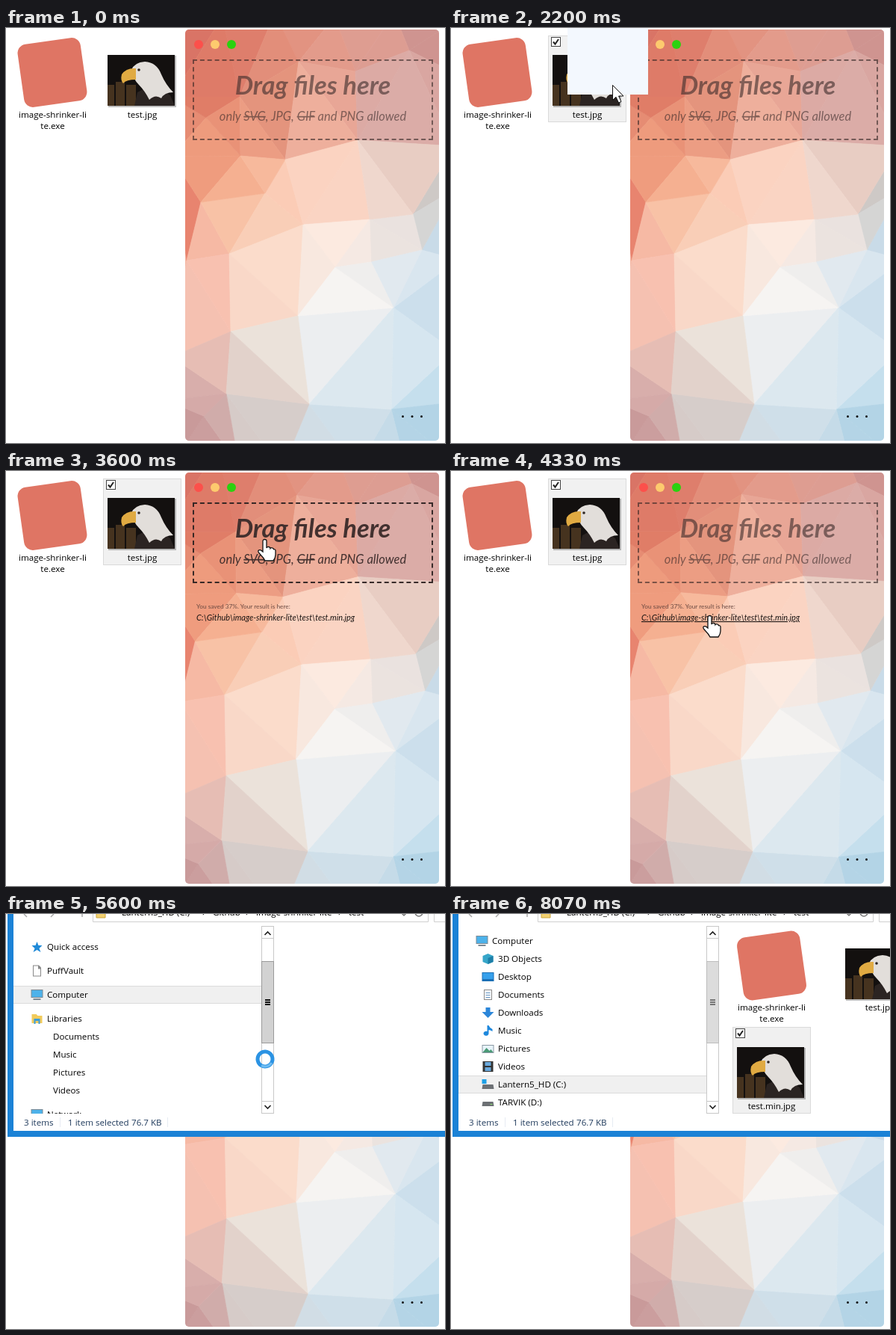
These frames come from a looping animation (588 px wide and 555 px high, 8.19 s). An HTML page:

```html
<!DOCTYPE html>
<html lang="en">
<head>
<meta charset="utf-8">
<title>Shrinking an image by drag and drop</title>
<style>
  html, body { margin: 0; width: 588px; height: 555px; overflow: hidden; background: #fff; }
  svg { display: block; }
  text { font: 11.6px "Open Sans", "Noto Sans", sans-serif; white-space: pre; }
  .mid { text-anchor: middle; }
  .lato, .lato text { font-family: Lato, "Open Sans", sans-serif; }
  #zone { fill: #3b2b2a; }
  #zone div { box-sizing: border-box; height: 108px; border: 2px dashed #2f2322; }
  #zone .title { font-size: 34.5px; font-weight: 700; font-style: italic; }
  #zone .hint { font-size: 16.5px; font-style: italic; }
  .hint .no { text-decoration: line-through; }
  #result .note { font-size: 8.3px; fill: #6b4a42; }
  #link { font-size: 10.95px; font-style: italic; fill: #1c1513; }
  .status { fill: #1e395b; }
</style>
</head>
<body>
<svg id="stage" width="588" height="555" viewBox="0 0 588 555">
  <defs>
    <clipPath id="appClip"><rect x="240" y="2" width="340" height="550" rx="5"/></clipPath>
    <clipPath id="navClip"><rect x="10" y="14" width="332" height="253"/></clipPath>
    <g id="logo"><rect x="-42.5" y="-42.5" width="85" height="85" rx="12" transform="rotate(-8)" fill="#df7564"/></g>
    <g id="photo">
      <rect x="1" y="1" width="91" height="69" fill="#000" opacity=".25"/>
      <path d="M0 0h90v68H0z" fill="#13100f"/>
      <path d="M0 40h9v28H0zM11 36h12v32H11zM25 40h13v28H25z" fill="#46331f"/>
      <path d="M40 50Q62 36 84 54L90 68H36z" fill="#2b2422"/>
      <path d="M32 20Q36 10 50 9Q66 10 72 26Q78 40 88 50Q76 50 72 58Q64 52 56 60Q50 48 42 40Q34 32 32 20Z" fill="#e2deda"/>
      <path d="M38 18Q25 17 19 26Q17 34 21 38Q25 33 38 33Z" fill="#e0aa42"/>
      <circle cx="42" cy="20" r="1.8" fill="#2b2422"/>
    </g>
    <g id="doc">
      <path d="M.5.5H45L63.5 19V83.5H.5z" fill="#f2f2f2" stroke="#d4d4d4"/>
      <path d="M45 .5V19H63.5z" fill="#fbfbfb" stroke="#d4d4d4"/>
    </g>
    <g id="box"><rect x=".5" y=".5" width="12" height="12" fill="#fff" stroke="#444"/></g>
    <path id="tick" d="M3 6.5L5.5 9.5L10 3" fill="none" stroke="#222" stroke-width="2"/>
  </defs>

  <g id="desktop">
    <use href="#logo" x="62" y="59.5"/>
    <text class="mid" x="62.5" y="120">image-shrinker-li</text>
    <text class="mid" x="62.5" y="135">te.exe</text>
    <rect id="tile" x="130.5" y="10.5" width="104" height="115"/>
    <use href="#photo" x="136" y="36"/>
    <g id="check" transform="translate(134 12)"><use href="#box"/><use id="checkMark" href="#tick"/></g>
    <text class="mid" x="182.5" y="120">test.jpg</text>
  </g>

  <g id="app" class="lato">
    <g clip-path="url(#appClip)"><g id="facets" stroke-width=".7" stroke-linejoin="round"></g></g>
    <circle cx="258" cy="22" r="6" fill="#fc504b"/>
    <circle cx="280" cy="22" r="6" fill="#fdca6e"/>
    <circle cx="302" cy="22" r="6" fill="#2bd10f"/>
    <g id="zone">
      <foreignObject x="250" y="42" width="322" height="108"><div></div></foreignObject>
      <text class="title mid" x="411" y="89">Drag files here</text>
      <text class="hint mid" x="411" y="124">only <tspan class="no">SVG</tspan>, JPG, <tspan class="no">GIF</tspan> and PNG allowed</text>
    </g>
    <g id="result">
      <text class="note" x="255" y="184">You saved 37%. Your result is here:</text>
      <text id="link" x="255" y="200">C:\Github\image-shrinker-lite\test\test.min.jpg</text>
    </g>
    <g fill="#111"><circle cx="531.5" cy="519.5" r="1.5"/><circle cx="544" cy="519.5" r="1.5"/><circle cx="556.5" cy="519.5" r="1.5"/></g>
  </g>

  <g id="explorer">
    <rect id="frame" x="2" y="-202" width="700" height="500"/>
    <rect x="10" y="-194" width="684" height="484" fill="#fff"/>
    <path d="M116.5-20V10.5H565.5V-20M573.5-20V10.5H640" fill="none" stroke="#d0d0d0"/>
    <g id="content">
      <path d="M121-8h12V5H121z" fill="#f3d06f" stroke="#c9a53c"/>
      <path d="M24 0l4 4M60 4l4-4M102-6V4" fill="none" stroke="#aaa" stroke-width="1.5"/>
      <path d="M530-1l3 3 3-3M548-2a5 5 0 0 0 10 0" fill="none" stroke="#777" stroke-width="1.5"/>
      <g><text x="155" y="2">Lantern5_HD (C:)</text><text x="263" y="2">›</text><text x="277" y="2">Github</text>
        <text x="321" y="2">›</text><text x="335" y="2">image-shrinker-lite</text><text x="445" y="2">›</text><text x="459" y="2">test</text></g>
      <g clip-path="url(#navClip)"><g id="nav1"></g><g id="nav2"></g></g>
      <g fill="#fff" stroke="#c8c8c8">
        <rect x="342.5" y="16.5" width="16" height="250"/><path d="M342.5 32.5h16M342.5 250.5h16"/>
        <rect id="thumb" x="342.5" y="63.5" width="16" height="109"/>
      </g>
      <path d="M346.5 28l4-4 4 4M346.5 256l4 4 4-4" fill="none" stroke="#222" stroke-width="1.7"/>
      <path id="grip" d="M347 115h7M347 118h7M347 121h7" stroke-width="2"/>
      <g id="files">
        <rect id="pick" x="377.5" y="151.5" width="104" height="115"/>
        <g id="docs"><use href="#doc" x="397" y="27"/><use href="#doc" x="543" y="27"/><use href="#doc" x="397" y="159"/></g>
        <g id="thumbs"><use href="#logo" x="429.5" y="69"/><use href="#photo" x="528" y="46"/><use href="#photo" x="383" y="178"/></g>
        <g transform="translate(381 153)"><use href="#box"/><use href="#tick"/></g>
        <text class="mid" x="429.5" y="129">image-shrinker-li</text>
        <text class="mid" x="429.5" y="144">te.exe</text>
        <text class="mid" x="574.5" y="129">test.jpg</text>
        <text class="mid" x="429.5" y="261">test.min.jpg</text>
      </g>
      <text class="status" x="24" y="283">3 items</text>
      <text class="status" x="83" y="283">1 item selected</text>
      <text class="status" x="168" y="283">76.7 KB</text>
      <path d="M72.5 272v13M216.5 272v13" stroke="#e6ebf2"/>
    </g>
  </g>

  <g id="pointer">
    <rect id="ghost" x="-60" y="-95" width="108" height="108" fill="#f3f8fe"/>
    <path id="arrow" d="M.5.5V20.5L5 16.3L8.5 24L12 22.5L8.6 15H15z" fill="#fff" stroke="#111"/>
    <path id="hand" d="M-3 2Q-3-.5-.5-.5T2 2V11Q3 9 5 9.5T7 11.5Q8 10 10 11T11 13Q13 12 14 14V20Q14 24 11 28H0Q-2 24-6 20Q-10 16-9 14.5Q-7 12-3 16Z" fill="#fff" stroke="#111" stroke-width="1.3"/>
    <g id="busy" fill="none"><circle r="10" stroke="#2b93e3" stroke-width="5"/><path d="M0-10A10 10 0 0 1 10 0" stroke="#6fbcf2" stroke-width="3"/></g>
  </g>
</svg>
<script>
const LOOP = 8190, FPS = 15;
const $ = id => document.getElementById(id);
const add = (parent, tag, attrs, text) => {
  const node = document.createElementNS('http://www.w3.org/2000/svg', tag);
  set(node, attrs);
  if (text) node.textContent = text;
  return parent.appendChild(node);
};
function set(node, attrs) { for (const k in attrs) node.setAttribute(k, attrs[k]); }
const show = (id, on) => { $(id).style.display = on ? '' : 'none'; };

// Low-poly backdrop: Delaunay mesh, tinted from nearby colour anchors
const points = [
  [215,-20],[290,-15],[360,-20],[440,-15],[520,-20],[610,-15],[605,62],[600,158],[602,215],[605,310],
  [600,432],[605,500],[600,580],[535,585],[470,590],[370,590],[312,585],[225,580],[215,498],[222,440],
  [242,311],[222,172],[222,92],[313,92],[268,120],[392,45],[468,58],[540,30],[261,233],[299,302],
  [347,221],[398,263],[487,256],[545,249],[557,297],[519,374],[391,385],[301,406],[295,489],[406,503],
  [516,510],[265,519],[471,150],[441,320],[374,176],[314,171],[489,313]
];
const tints = [
  [255,25,'d97466'],[320,25,'de7e6c'],[365,25,'e28e7a'],[435,22,'e39b8b'],[500,25,'dd9d92'],[555,20,'cf9490'],
  [265,85,'e07d67'],[360,100,'e4947d'],[428,90,'e8a696'],[520,95,'dbaba6'],[300,135,'e99277'],[410,145,'efb09d'],
  [500,140,'deb3ac'],[240,239,'e8846f'],[270,178,'ef9c7e'],[307,208,'f5b091'],[266,282,'f6b9a4'],[302,252,'f8c2a6'],
  [345,190,'f7b99c'],[373,220,'fbccb6'],[348,262,'f9ceb7'],[430,210,'fbd4c2'],[501,218,'efd7cd'],[539,186,'e8cdc3'],
  [572,225,'cdc8c6'],[568,254,'d5d5d4'],[588,274,'c9dbe8'],[515,275,'ebe3df'],[440,285,'fceae0'],[350,330,'fbdccb'],
  [270,350,'f8c1b0'],[450,355,'f6f4f2'],[490,335,'efeeed'],[540,335,'dfe9f0'],[575,350,'cbdfec'],[435,420,'eceef0'],
  [366,430,'ebe2da'],[330,465,'e2d2cb'],[275,440,'e6bdb4'],[258,485,'d8aeab'],[250,525,'c99a9a'],[340,520,'d6cdca'],
  [480,460,'dce8ef'],[545,430,'d6e6f0'],[545,475,'c5dfed'],[460,535,'cfdfe9'],[555,530,'b3d4e6']
];
function tintAt(x, y) {
  const sum = [0, 0, 0];
  let total = 0;
  for (const [tx, ty, hex] of tints) {
    const w = 1 / ((x - tx) ** 2 + (y - ty) ** 2 + 30) ** 2.2;
    total += w;
    for (let c = 0; c < 3; c++) sum[c] += w * parseInt(hex.substr(c * 2, 2), 16);
  }
  return `rgb(${sum.map(v => Math.round(v / total))})`;
}
function emptyCircle([ax, ay], [bx, by], [cx, cy]) {
  const d = 2 * (ax * (by - cy) + bx * (cy - ay) + cx * (ay - by));
  if (Math.abs(d) < 1e-6) return false;
  const a = ax * ax + ay * ay, b = bx * bx + by * by, c = cx * cx + cy * cy;
  const x = (a * (by - cy) + b * (cy - ay) + c * (ay - by)) / d;
  const y = (a * (cx - bx) + b * (ax - cx) + c * (bx - ax)) / d;
  const r = (ax - x) ** 2 + (ay - y) ** 2 - 1e-3;
  return points.every(([px, py]) => (px - x) ** 2 + (py - y) ** 2 >= r);
}
points.forEach((a, i) => points.slice(i + 1).forEach((b, j) => {
  for (const c of points.slice(i + j + 2)) {
    if (!emptyCircle(a, b, c)) continue;
    const fill = tintAt((a[0] + b[0] + c[0]) / 3, (a[1] + b[1] + c[1]) / 3);
    add($('facets'), 'polygon', { points: [a, b, c].join(' '), fill, stroke: fill });
  }
}));

// Navigation trees
const icons = {
  star: [['M0-7L2-2 7-2 3 2 5 7 0 4-5 7-3 2-7-2-2-2z', '#1f8ad8']],
  page: [['M-5.5-7.5h8l3 3v12h-11z', '#888'], ['M-4.5-6.5h6v4h3v9h-9z', '#fff']],
  pc: [['M-8-7h16v11h-16z', '#7d8a94'], ['M-7-6h14v9h-14z', '#4db2ea'], ['M-5 5h10v2h-10z', '#7d8a94']],
  shelf: [['M-7-6h6l2 2h6v10h-14z', '#f1cb5c'], ['M-4 0h8v7h-2v-4h-4v4h-2z', '#3c9edb']],
  cube: [['M-7-4L0-7 7-4V4L0 7-7 4z', '#37a6c9'], ['M0-1L7-4V4L0 7z', '#1d7fa8']],
  desk: [['M-8-6h16v12h-16z', '#1a6fb5'], ['M-7-5h14v8h-14z', '#35a0ec']],
  text: [['M-5.5-7h11v14h-11z', '#8a8a8a'], ['M-4.5-6h9v12h-9z', '#fff'], ['M-3-3h6v1h-6zM-3 0h6v1h-6zM-3 3h6v1h-6z', '#5c8fc0']],
  down: [['M-3-7h6v6h5L0 7-8-1h5z', '#2b86d9']],
  note: [['M-1-7h2q1 3 5 5v3q-3-2-5-2v5a3.5 3 0 1 1-2-3z', '#1e88dd']],
  pic: [['M-8-5h16v11h-16z', '#8a98a2'], ['M-7-4h14v9h-14z', '#e8f4fb'], ['M-7 5l5-6 4 4 2-2 3 4z', '#4a9a76']],
  film: [['M-7-7h14v14h-14z', '#333'], ['M-4-6h8v5h-8zM-4 1h8v5h-8z', '#6aa9dc']],
  disk: [['M-7-1h14l1 6h-16z', '#6c7074'], ['M3 2h3v1h-3z', '#8be06c']],
  sysdisk: [['M-7 0h14l1 6h-16z', '#6c7074'], ['M-8-7h6v6h-6z', '#1ea0e6']]
};
function tree(parent, selected, rows) {
  add(parent, 'rect', { x: 9.5, y: selected - 11.5, width: 333, height: 23, fill: '#f0f0f0', stroke: '#dcdcdc' });
  for (const [label, y, x, icon] of rows) {
    const g = add(parent, 'g', { transform: `translate(${x - 13.5} ${y})` });
    for (const [d, fill] of icons[icon] || []) add(g, 'path', { d, fill });
    add(parent, 'text', { x, y: y + 4 }, label);
  }
}
tree($('nav1'), 108, [
  ['Quick access', 44, 55, 'star'], ['PuffVault', 76, 55, 'page'], ['Computer', 108, 55, 'pc'],
  ['Libraries', 140, 55, 'shelf'], ['Documents', 164, 63], ['Music', 188, 63],
  ['Pictures', 212, 63], ['Videos', 236, 63], ['Network', 268, 55, 'pc']
]);
const deep = [['3D Objects', 'cube'], ['Desktop', 'desk'], ['Documents', 'text'], ['Downloads', 'down'], ['Music', 'note'],
  ['Pictures', 'pic'], ['Videos', 'film'], ['Lantern5_HD (C:)', 'sysdisk'], ['TARVIK (D:)', 'disk']];
tree($('nav2'), 228, [['Computer', 36, 55, 'pc'], ...deep.map(([label, icon], i) => [label, 60 + 24 * i, 63, icon])]);

// Tracks: [tick, values...] at 15 ticks per second
const path = [[4,577,536],[8,490,310],[11,405,150],[14,320,116],[17,235,113],[21,190,84],[25,184,72],[31,184,72],
  [33,216,76],[42,347,92],[58,347,92],[61,350,235],[62,350,247],[65,347,194],[109,347,194],[111,310,300],[113,240,430],[115,122,560]];
const zoom = [[3,0],[16,1],[17,1],[29,0],[45,0],[56,1],[81,1],[93,0],[110,0],[112,.12],[115,0]];
const zoneFade = [[11,.6],[16,.95],[17,.85],[22,.6],[36,.6],[41,.95],[58,.95],[63,.6]];
const openFade = [[81,.17],[82,.55],[83,.85],[84,1]];
const openSize = [[81,.96],[84,1]];
const smooth = p => p * p * (3 - 2 * p);
const linear = p => p;

function at(track, k, ease = linear) {
  if (k <= track[0][0]) return track[0].slice(1);
  const i = track.findIndex(row => row[0] > k);
  if (i < 0) return track[track.length - 1].slice(1);
  const a = track[i - 1], b = track[i], p = ease((k - a[0]) / (b[0] - a[0]));
  return a.slice(1).map((v, n) => v + (b[n + 1] - v) * p);
}
const inside = (x, y, l, t, r, b) => x >= l && x < r && y >= t && y < b;
const between = (k, a, b) => k >= a && k < b;
const about = (x, y, s) => `translate(${x} ${y}) scale(${s}) translate(${-x} ${-y})`;

function render(ms) {
  const k = Math.floor((ms + 4) * FPS / 1000);
  const [x, y] = at(path, k);

  // App window
  set($('facets'), { transform: about(455, 365, 1 + .043 * at(zoom, k, smooth)[0]) });
  set($('zone'), { opacity: at(zoneFade, k)[0] });
  const onLink = k >= 58 && inside(x, y, 255, 188, 468, 206);
  show('result', k >= 48);
  $('link').style.textDecoration = onLink ? 'underline' : 'none';

  // Desktop file
  const picked = k >= 30, hovered = inside(x, y, 130, 10, 235, 126);
  show('tile', picked || hovered);
  show('check', picked || hovered);
  show('checkMark', picked);
  set($('tile'), picked ? { fill: '#f1f1f1', stroke: '#dadada' } : { fill: '#e7f3fc', stroke: '#cfe6f8' });

  // File manager
  $('stage').insertBefore($('explorer'), k < 82 ? $('app') : $('pointer'));
  show('explorer', k >= 81);
  set($('explorer'), { opacity: at(openFade, k)[0], transform: about(352, 48, at(openSize, k, smooth)[0]) });
  set($('frame'), { fill: k === 120 ? '#3f97de' : '#1b82d6' });
  show('content', k >= 84);
  show('files', k >= 96);
  show('nav1', k < 99);
  show('nav2', k >= 99);
  show('docs', k < 100);
  show('thumbs', k >= 100);
  const active = k < 109;
  set($('pick'), active ? { fill: '#cfe3fb', stroke: '#86aede' } : { fill: '#f0f0f0', stroke: '#dadada' });
  set($('thumb'), active ? { fill: '#d2d2d2', stroke: '#9a9a9a' } : { fill: '#dcdcdc', stroke: '#bdbdbd' });
  set($('grip'), { stroke: active ? '#111' : '#777' });

  // Pointer
  const dragging = between(k, 31, 45), busy = between(k, 81, 88);
  const hand = !dragging && k < 81 && (onLink || inside(x, y, 250, 42, 572, 150));
  show('pointer', between(k, 4, 116));
  set($('pointer'), { transform: `translate(${x} ${y})` });
  show('ghost', dragging);
  show('hand', hand);
  show('busy', busy);
  show('arrow', !hand && !busy);
  set($('busy'), { transform: `rotate(${(k - 81) * 40})` });
}

const start = performance.now();
function loop() {
  render((performance.now() - start) % LOOP);
  requestAnimationFrame(loop);
}
loop();
</script>
</body>
</html>
```
